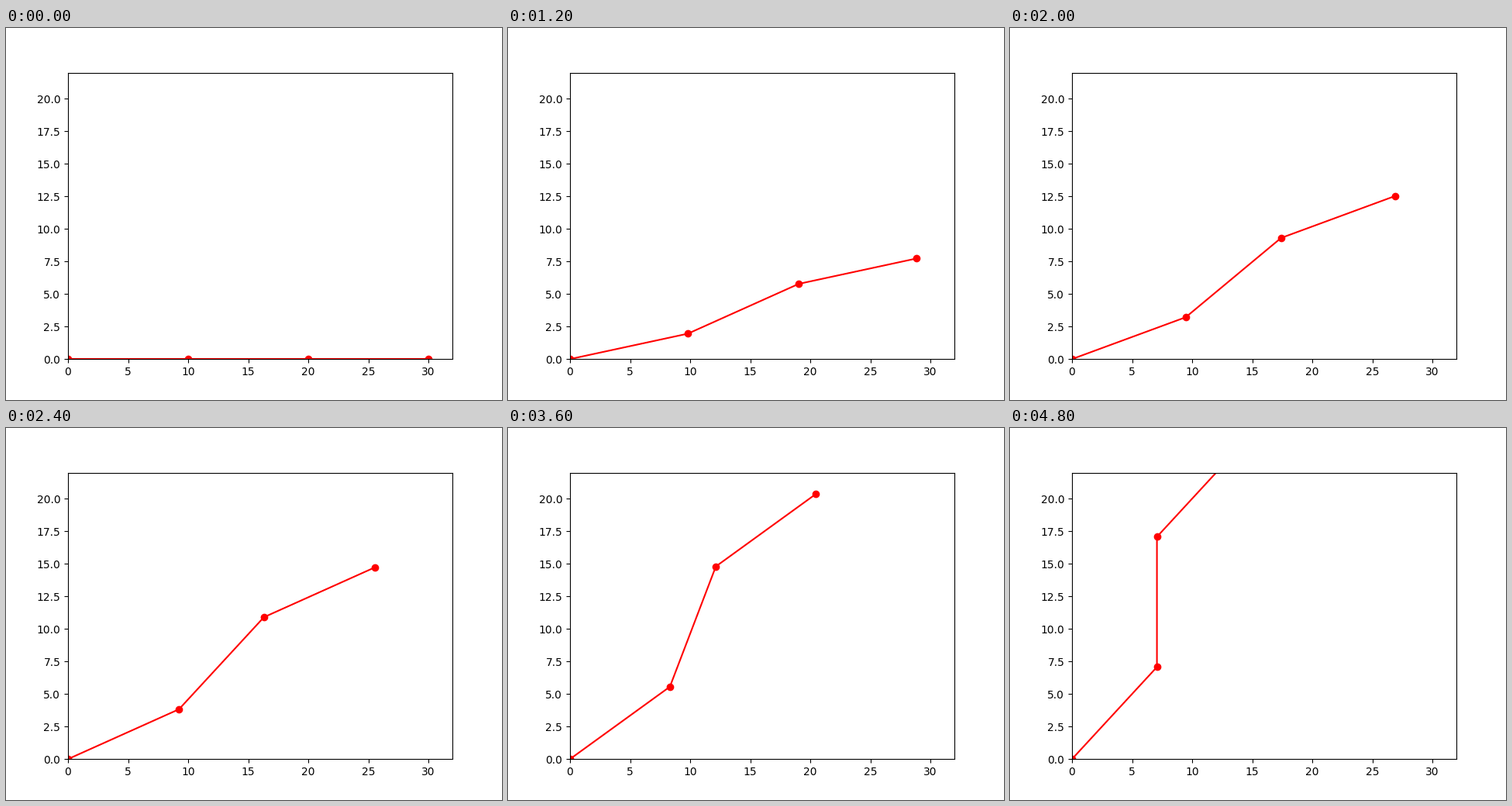
A matplotlib script that plays this animation: 640 px wide and 480 px high, repeating every 5 s.

```python
import numpy as np
import matplotlib.pyplot as plt
from matplotlib.animation import FuncAnimation

FRAMES = 25
INTERVAL = 200
LINK = 10
MAX_ANGLE = np.pi / 4


def joints(angle):
    """Joint positions of a three-link arm whose middle link turns twice as fast."""
    headings = angle * np.array([1, 2, 1])
    x = np.concatenate([[0], np.cumsum(LINK * np.cos(headings))])
    y = np.concatenate([[0], np.cumsum(LINK * np.sin(headings))])
    return x, y


fig, ax = plt.subplots(figsize=(6.4, 4.8), dpi=100)
ax.set_xlim(0, 32)
ax.set_ylim(0, 22)
arm, = ax.plot([], [], "o-", color="red")


def update(frame):
    arm.set_data(*joints(MAX_ANGLE * frame / (FRAMES - 1)))
    return arm,


anim = FuncAnimation(fig, update, frames=FRAMES, interval=INTERVAL,
                     repeat=True, repeat_delay=0)
plt.show()
```
